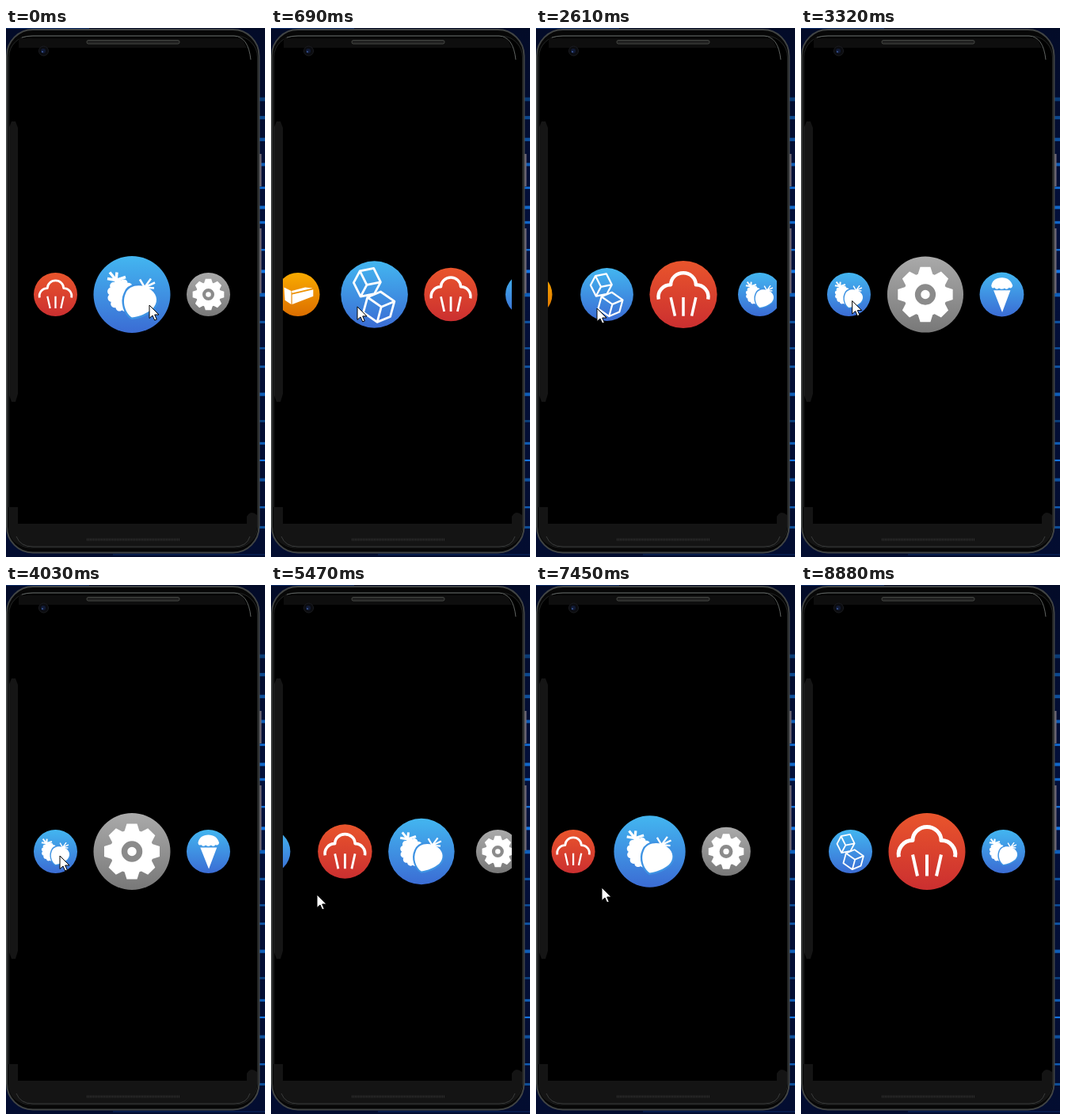
An HTML page for the animation above (9.16 s loop, 327x668 px).

```html
<!DOCTYPE html>
<html lang="en">
<head>
<meta charset="utf-8">
<title>Icon carousel</title>
<style>
html, body { margin: 0; width: 100%; height: 100%; overflow: hidden; background: #000; }
svg { display: block; width: 327px; height: 668px; }
</style>
</head>
<body>
<svg viewBox="0 0 327 668" xmlns="http://www.w3.org/2000/svg">
  <defs>
    <linearGradient id="blue" x2="0" y2="1"><stop stop-color="#43b6f0"/><stop offset="1" stop-color="#3b6cd4"/></linearGradient>
    <linearGradient id="red" x2="0" y2="1"><stop stop-color="#e9552c"/><stop offset="1" stop-color="#cb2f30"/></linearGradient>
    <linearGradient id="gray" x2="0" y2="1"><stop stop-color="#aaa"/><stop offset="1" stop-color="#787878"/></linearGradient>
    <linearGradient id="orange" x2="0" y2="1"><stop stop-color="#f9ab00"/><stop offset="1" stop-color="#dc6e00"/></linearGradient>
    <linearGradient id="night" x2="0" y2="1"><stop stop-color="#030b28"/><stop offset=".4" stop-color="#03103c"/><stop offset="1" stop-color="#030d30"/></linearGradient>
    <clipPath id="screen"><rect x="15" y="25" width="289" height="601"/></clipPath>
  </defs>

  <rect width="327" height="668" fill="url(#night)"/>
  <g id="streaks"></g>

  <g id="phone" fill="none">
    <path d="M321 159V200M321 253V335" stroke="#716a78" stroke-width="3"/>
    <rect x="1" y="2" width="318.500" height="660.500" rx="33" fill="#070707" stroke="#414444" stroke-width="2"/>
    <rect x="3.500" y="10" width="314" height="646" rx="27" fill="#000" stroke="#242626"/>
    <path d="M16 13H298L304 25H16Z" fill="#0e0e0e"/>
    <path d="M20 12Q27 10 34 10H288Q306 11 309 40" stroke="#606462"/>
    <path d="M4 125L7 118H12L15 126V462L12 472H7L4 464Z" fill="#151515"/>
    <path d="M3 605H15V626H304V617Q309 608 317 615V630Q315 655 291 655H30Q4 655 3 630Z" fill="#141414"/>
    <path d="M13 642Q18 655 34 655H288Q304 655 308 642" stroke="#3a3c3c"/>
    <rect x="102" y="15.500" width="117" height="4.500" rx="2" fill="#202020" stroke="#454743"/>
    <path d="M102 646H219" stroke="#303030" stroke-width="3" stroke-dasharray="1 1"/>
    <circle cx="47.500" cy="29" r="6" fill="#0b0c10" stroke="#1b1c20"/>
    <circle cx="47" cy="29" r="3" fill="#111a35"/>
    <circle cx="46" cy="30" r="1" fill="#3f5c9c"/>
  </g>

  <g clip-path="url(#screen)"><g id="icons"></g></g>
  <path id="cursor" d="M0 0V16.500L4 13L6.700 19L9.300 18L6.700 12H12Z" fill="#fff" stroke="#000"/>
</svg>
<script>
const LOOP = 9160, STEP = 137, MID = 159, ROW = 336.5, GAP = 96.5, BIG = 48.5, SMALL = 27.5;
const $ = id => document.getElementById(id);

const line = (d, w) => `<path d="${d}" fill="none" stroke="#fff" stroke-width="${w}" stroke-linejoin="round"/>`;
const solid = d => `<path d="${d}" fill="#fff"/>`;

// A cube in outline: one corner and the three edge directions.
function cube([x, y], [ax, ay], [bx, by], [cx, cy], turned) {
  const hex = `M${x} ${y}l${ax} ${ay}l${bx} ${by}l${cx} ${cy}l${-ax} ${-ay}l${-bx} ${-by}Z`;
  const hub = turned ? [x + ax + cx, y + ay + cy] : [x + bx, y + by];
  const s = turned ? -1 : 1;
  const spokes = [[ax, ay], [-bx, -by], [cx, cy]].map(([dx, dy]) => `M${hub}l${s * dx} ${s * dy}`);
  return line(hex + spokes.join(''), 3.2);
}

function cupcake() {
  const folds = [-1, 0, 1].map(i => `M${i * 18} 4L${i * 12} 31`).join('');
  return line('M-35.500 7A17.500 17.500 0 0 1 -18 -14A18 17 0 0 1 18 -14A17.500 17.500 0 0 1 35.500 7', 5) + line(folds, 4);
}

function gear() {
  let teeth = '';
  for (let a = 0; a < 360; a += 45)
    teeth += `<path d="M-10 -24L-6.500 -35H6.500L10 -24Z" transform="rotate(${a})"/>`;
  return `<g fill="#fff">${teeth}<circle r="27.500"/></g>
    <circle r="9.500" fill="none" stroke="#8b8b8b" stroke-width="7.500"/>`;
}

function berries() {
  let bumps = '';
  for (let a = 0; a < 360; a += 30) {
    const r = a * Math.PI / 180;
    bumps += `<circle cx="${13 * Math.cos(r)}" cy="${16 * Math.sin(r)}" r="5"/>`;
  }
  return `<g fill="#fff" transform="translate(-13 1) rotate(-15)">${bumps}<ellipse rx="14" ry="17"/></g>
    ${line('M-31 -20L-20 -18L-28 -28M-20 -18L-19 -28M-20 -18L-8 -22', 3.5)}
    <path d="M-8 -1C-4 -13 14 -14 24 -6C33 1 33 11 26 18C19 24 9 28 0 29C-8 24 -13 10 -8 -1Z"
      fill="#fff" stroke="#3e93e3" stroke-width="5" paint-order="stroke"/>
    ${line('M10 -19L16 -9L24 -20M16 -9L29 -15M16 -9L28 -8', 2.5)}`;
}

const icons = [
  ['orange', solid('M-31 -16L-15 -8V22L-29 13ZM-13 0L34 -11V4L-13 22ZM-14 -8L16 -16L33 -14L-13 -3Z')],
  ['blue', cube([-21, -34], [20, -4], [10, 20], [-9, 17]) + cube([-10, 4], [19, -8], [20, 14], [-6, 22])],
  ['red', cupcake()],
  ['blue', berries()],
  ['gray', gear()],
  ['blue', solid('M-23 -19C-21 -31 -12 -37 0 -37S21 -31 24 -19Q22 -12 16 -15Q11 -9 6 -14Q0 -9 -6 -14Q-12 -9 -16 -15Q-22 -12 -23 -19ZM-18 -9H19L1 39Z')]
];
$('icons').innerHTML = icons.map(([tone, art]) =>
  `<g><circle r="${BIG}" fill="url(#${tone})"/>${art}</g>`).join('');
const nodes = [...$('icons').children];

let seed = 7;
const random = () => (seed = seed * 16807 % 2147483647) / 2147483647;
let streaks = '<path d="M0 .5H105M135 665H327" stroke="#0a2a66"/>';
for (let y = 90; y < 650; y += 18 + 18 * random())
  streaks += `<path d="M319 ${y}H327" stroke="hsl(212 85% ${25 + 25 * random()}%)" stroke-width="${2 + 3 * random()}"/>`;
$('streaks').innerHTML = streaks;

// Each gesture: start, end, centred icon afterwards, pointer tip afterwards.
const rest = [0, 0, 3, 181, 350];
const gestures = [
  [150, 1050, 1.2, 105, 352],
  [1210, 1510, 1, 69, 352],
  [1640, 1910, 1, 146, 354],
  [2210, 2610, 1.72, 77, 354],
  [2760, 3170, 4.05, 60, 348],
  [3320, 3720, 4, 68, 342],
  [4620, 5170, 3.97, 35, 376],
  [5470, 5470, 2.68, 58, 391],
  [5590, 6370, 3, 76, 416],
  [6520, 7450, 3.16, 83, 382],
  [7600, 7880, 3, 100, 401],
  [8190, 8460, 2, 100, 401],
  [8730, 8880, 2, 131, 496]
];
const easeOut = u => 1 - (1 - u) ** 3;

// Gestures advance in even steps of about STEP ms, the last one landing on the end time.
function pose(time) {
  const i = gestures.findLastIndex(g => g[0] <= time);
  if (i < 0) return rest.slice(2);
  const from = gestures[i - 1] || rest, to = gestures[i];
  const span = to[1] - to[0], gaps = Math.round(span / STEP);
  const step = gaps ? Math.min(gaps, Math.floor((time - to[0]) * gaps / span)) : 0;
  const u = easeOut((step + 1) / (gaps + 1));
  return to.slice(2).map((v, j) => from[j + 2] + (v - from[j + 2]) * u);
}

function render(time) {
  const [pos, x, y] = pose(time);
  nodes.forEach((node, i) => {
    const off = i - pos;
    const r = BIG - (BIG - SMALL) * Math.min(1, Math.abs(off));
    node.setAttribute('transform', `translate(${MID + off * GAP} ${ROW}) scale(${r / BIG})`);
  });
  $('cursor').setAttribute('transform', `translate(${x} ${y})`);
  $('cursor').style.display = time < gestures[gestures.length - 1][1] ? '' : 'none';
}

const start = performance.now();
function loop() {
  render((performance.now() - start) % LOOP);
  requestAnimationFrame(loop);
}
loop();
</script>
</body>
</html>
```
